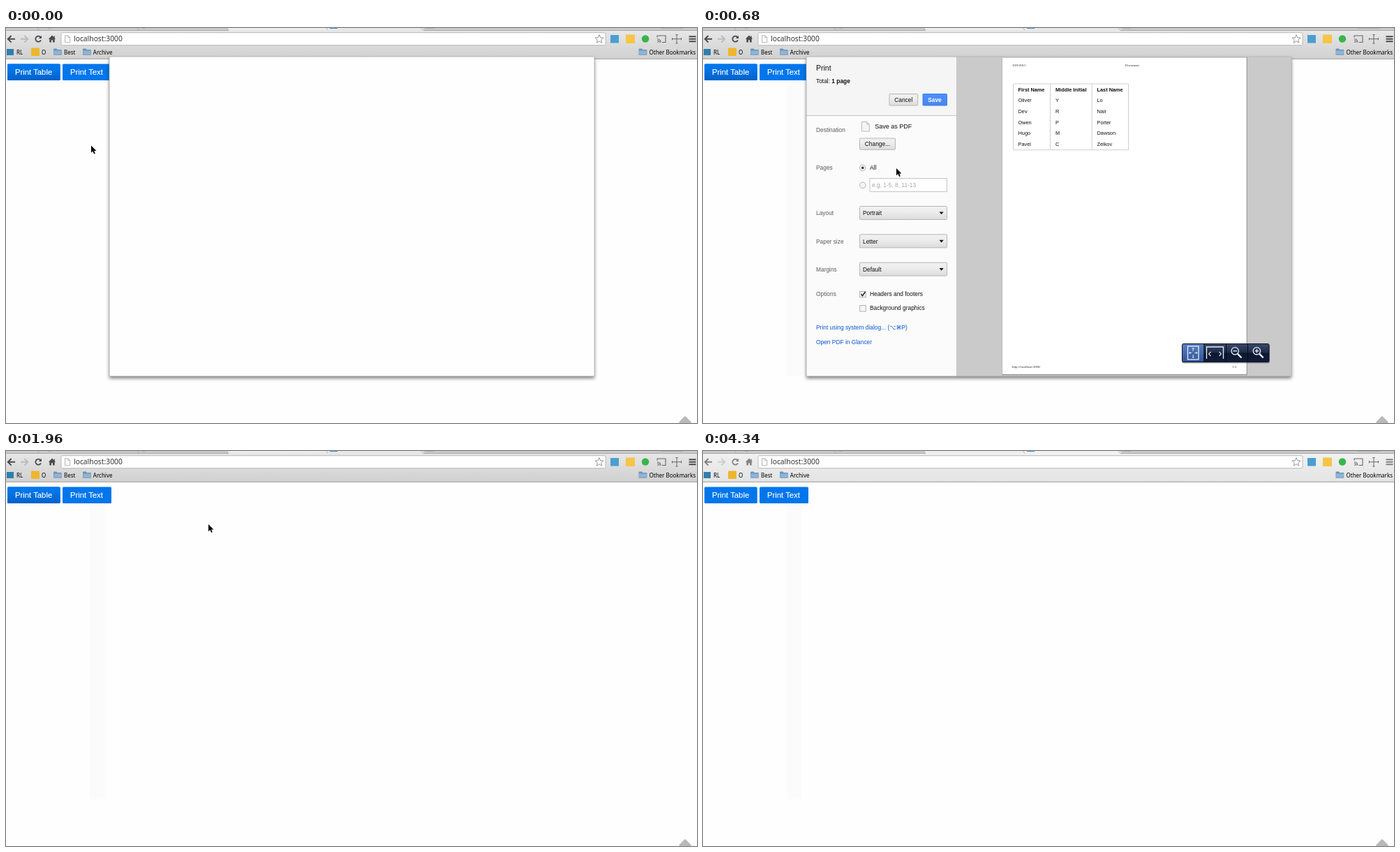
Animation, 990 px wide and 566 px high, one loop 4.44 s. Source, as an HTML page:

```html
<!DOCTYPE html>
<html lang="en">
<head>
<meta charset="utf-8">
<title>Print dialog</title>
<style>
  html, body { margin: 0; width: 100%; height: 100%; overflow: hidden; background: #fefefe; }
  svg { display: block; }
  text { font: 8.4px "Liberation Sans", Arial, sans-serif; fill: #111; white-space: pre; }
  .ui text { font: 8px "Noto Sans", sans-serif; fill: #000; }
  .ui .url { font-size: 10.3px; fill: #333; }
  .btn text { font-size: 11.3px; fill: #fff; stroke: #fff; stroke-width: .15; }
  .label { fill: #5c5c5c; }
  .link { fill: #1155cc; fill: #0b57d6; }
  .bold { font-weight: bold; }
  .mid { text-anchor: middle; }
  .table text { font-size: 7.35px; }
  .small text { font: 4.75px "Liberation Serif", serif; fill: #222; }
  .keys { font-family: "DejaVu Sans", sans-serif; font-size: 8px; }
</style>
</head>
<body>
<svg id="stage" width="990" height="566" viewBox="0 0 990 566">
  <defs>
    <linearGradient id="bar" x2="0" y2="1"><stop stop-color="#e9e9e9"/><stop offset=".5" stop-color="#dcdcdc"/><stop offset="1" stop-color="#d0d0d0"/></linearGradient>
    <linearGradient id="barIdle" x2="0" y2="1"><stop stop-color="#f2f2f2"/><stop offset="1" stop-color="#e3e3e3"/></linearGradient>
    <linearGradient id="pressed" x2="0" y2="1"><stop stop-color="#0078ee"/><stop offset=".35" stop-color="#0075e8"/><stop offset="1" stop-color="#0061c8"/></linearGradient>
    <linearGradient id="grey" x2="0" y2="1"><stop stop-color="#f1f1f1"/><stop offset=".4" stop-color="#ededed"/><stop offset="1" stop-color="#dcdcdc"/></linearGradient>
    <linearGradient id="greyDown" x2="0" y2="1"><stop stop-color="#dedede"/><stop offset="1" stop-color="#cfcfcf"/></linearGradient>
    <linearGradient id="blue" x2="0" y2="1"><stop stop-color="#4d90fe"/><stop offset="1" stop-color="#4787ed"/></linearGradient>
    <linearGradient id="navy" x2="0" y2="1"><stop stop-color="#3b4a69"/><stop offset=".48" stop-color="#1c2a48"/><stop offset=".52" stop-color="#0c1730"/><stop offset="1" stop-color="#101d3b"/></linearGradient>
    <linearGradient id="navyOn" x2="0" y2="1"><stop stop-color="#5a7fbe"/><stop offset="1" stop-color="#2f559c"/></linearGradient>
    <filter id="drop" x="-5%" y="-5%" width="110%" height="112%"><feDropShadow dx="0" dy="3" stdDeviation="2.4" flood-opacity=".5"/></filter>
    <clipPath id="below"><path d="M0 45H148V30H843V45H990V566H0z"/></clipPath>
    <g id="folder">
      <path d="M0 2a1 1 0 0 1 1-1h3.5l1.2 1.4H11a.8.8 0 0 1 .8.8V9.400a.8.8 0 0 1-.8.8H.8A.8.8 0 0 1 0 9.400z" fill="#6d95ba"/>
      <path d="M.5 4H11.300V9.300H.5z" fill="#8fb4d6"/>
    </g>
    <g id="caret"><path d="M0 0h6.200L3.100 3.600z" fill="#111"/></g>
  </defs>

  <rect width="990" height="566" fill="#fefefe"/>
  <rect data-on="230-4440" x="120" y="76" width="21.500" height="423" fill="#fbfbfb"/>

  <g class="ui">
    <rect width="990" height="44.500" fill="url(#bar)"/>
    <rect data-on="4340-4440" width="990" height="44.500" fill="url(#barIdle)"/>
    <path d="M0 0H316L319 3.500H0zM597 0H990V3.500H600z" fill="#c9c9c9"/>
    <path d="M319 0H459L462 3H321z" fill="#ededed"/>
    <path d="M0 3.500H318.500L316.500 0M45 0L48 3.500M188 0L191 3.500M458.500 0L461 3M594.500 0L598 3.500H990" fill="none" stroke="#a6a6a6" stroke-width=".9"/>
    <path d="M464 0h11v1h-11z" fill="#3d8fd8"/>
    <path d="M60 0h5M195 0h5M602 0h11M938 0h32" stroke="#999" stroke-width="1"/>
    <path d="M0 44.300H990" stroke="#a2a2a2"/>

    <g id="nav" fill="none" stroke="#4c4c4c" stroke-width="2">
      <path d="M13 15.800H3M7.600 11L2.800 15.800L7.600 20.600"/>
      <path d="M21 15.800H31M26.400 11L31.200 15.800L26.400 20.600" stroke="#bcbcbc"/>
      <path d="M49.600 13.400A4 4 0 1 0 50 17.300" stroke-width="1.800"/>
      <path d="M51 10.800V15H46.800z" fill="#4c4c4c" stroke="none"/>
      <path d="M66 10.600L60.800 15.800H62.300V20.600H65V17.300H67V20.600H69.700V15.800H71.200L69.800 14.300V11.600H68.500V13z" fill="#4c4c4c" stroke="none"/>
      <path d="M978.500 12.200H988.500M978.500 15.700H988.500M978.500 19.200H988.500"/>
    </g>

    <rect x="79" y="6.700" width="780" height="18" rx="1.500" fill="#fff" stroke="#b4b4b4" stroke-width=".9"/>
    <path d="M84.500 10.800H89L91.800 13.600V20.800H84.500zM89 10.800V13.600H91.800" fill="#fcfcfc" stroke="#a4a4a4" stroke-width=".8"/>
    <text class="url" x="97" y="19.400">localhost:3000</text>
    <path id="star" fill="#fff" stroke="#8c8c8c" stroke-width=".9"/>

    <rect x="866" y="10" width="12" height="11.500" fill="#4a9fd0"/>
    <rect x="888" y="9.500" width="13" height="12.500" fill="#f6c548"/>
    <circle cx="916" cy="15.500" r="5.200" fill="#38b54a"/>
    <path d="M933 13.500V11H945V20.500H940M933 20.500H934.200M933 18A2.500 2.500 0 0 1 935.800 20.700M933 15.800A4.800 4.800 0 0 1 938 20.700" fill="none" stroke="#666" stroke-width="1.100"/>
    <path d="M954.500 15.700H967.500M961 9.500V22M954.500 14V17.400M967.500 14V17.400M959.400 9.500H962.600M959.400 22H962.600" fill="none" stroke="#686868"/>

    <rect x="1" y="30" width="10" height="9" fill="#2f7fae"/>
    <text x="15" y="37.500">RL</text>
    <rect x="36" y="28.500" width="12" height="11.500" rx="1" fill="#eeb62f"/>
    <text x="51" y="37.500">O</text>
    <use href="#folder" x="68" y="28.500"/><text x="83" y="37.500">Best</text>
    <use href="#folder" x="110" y="28.500"/><text x="124.800" y="37.500">Archive</text>
    <use href="#folder" x="906.500" y="28.500"/><text x="921.500" y="37.500">Other Bookmarks</text>
  </g>

  <g class="btn">
    <rect x="2" y="51.500" width="75.700" height="23.500" rx="1.500" fill="#0076ec"/>
    <rect data-on="0-2690" x="2" y="51.500" width="75.700" height="23.500" rx="1.500" fill="url(#pressed)"/>
    <rect x="81" y="51.500" width="70" height="23.500" rx="1.500" fill="#0076ec"/>
    <text x="13" y="66.700">Print Table</text>
    <text x="92" y="66.700">Print Text</text>
  </g>
  <rect x="966.500" y="558.500" width="13" height="13" rx="1.500" fill="#b9b9b9" transform="rotate(45 973 565)"/>

  <g id="dialog" data-on="0-1960">
    <rect x="148" y="41" width="695" height="458" fill="#fff" filter="url(#drop)"/>
    <rect x="148" y="41" width="695" height="458" fill="#fefefe"/>
    <g data-on="230-1960">
      <rect x="148" y="41" width="215.500" height="84.500" fill="#f5f5f5"/>
      <rect x="148" y="125.500" width="215.500" height="373.500" fill="#fbfbfb"/>
      <path d="M148 125.500H363.500M363.500 41V499" stroke="#c6c6c6" fill="none"/>
      <rect x="364" y="41" width="479" height="458" fill="#e4e4e4"/>
      <text x="162" y="61.200" style="font-size:10.500px">Print</text>
      <text x="162" y="79.200">Total: <tspan class="bold" data-on="230-470">0 sheet of paper</tspan><tspan class="bold" data-on="470-1960">1 page</tspan></text>

      <rect x="267" y="94.500" width="40.700" height="16.500" rx="1" fill="url(#grey)" stroke="#b0b0b0" stroke-width=".9"/>
      <rect data-on="1690-1960" x="267" y="94.500" width="40.700" height="16.500" rx="1" fill="url(#greyDown)" stroke="#8e8e8e" stroke-width=".9"/>
      <text class="mid" x="287.300" y="105.600">Cancel</text>
      <g data-on="230-470">
        <rect x="315" y="94.500" width="34.500" height="16.500" rx="1" fill="#f0f0f0" stroke="#cfcfcf" stroke-width=".9"/>
        <text class="mid bold" x="332" y="105.600" style="fill:#aaa">Save</text>
      </g>
      <g data-on="470-1960">
        <rect x="315" y="94.500" width="34.500" height="16.500" rx="1" fill="url(#blue)" stroke="#3079ed" stroke-width=".9"/>
        <rect data-on="1690-1960" x="315" y="94.500" width="34.500" height="16.500" rx="1" fill="none" stroke="#a3adbd" stroke-width="1.100"/>
        <text class="mid bold" x="332" y="105.600" style="fill:#fff">Save</text>
      </g>

      <text class="label" x="162" y="148.500">Destination</text>
      <path d="M227.500 134.500H234.800L238.300 138V148H227.500zM234.800 134.500V138H238.300" fill="#f5f5f5" stroke="#aaa" stroke-width=".8"/>
      <text x="246.300" y="144.300" style="font-size:9px">Save as PDF</text>
      <rect x="224.500" y="158" width="51" height="16.300" rx="1" fill="url(#grey)" stroke="#b0b0b0" stroke-width=".9"/>
      <text x="231.800" y="169">Change...</text>

      <g id="links">
        <text class="link" x="162" y="203.500">Print using system dialog... (<tspan class="keys">⌥⌘</tspan>P)</text>
        <text class="link" x="162" y="224.300">Open PDF in Glancer</text>
      </g>

      <g data-on="470-1960">
        <text class="label" x="162" y="203">Pages</text>
        <g fill="#f6f6f6" stroke="#a8a8a8" stroke-width=".9"><circle cx="228.800" cy="200.300" r="4.300"/><circle cx="228.800" cy="225.300" r="4.300"/></g>
        <circle cx="228.800" cy="200.300" r="1.900" fill="#444"/>
        <text x="239" y="203">All</text>
        <rect x="239" y="215.500" width="110.500" height="19" fill="#fff" stroke="#bfbfbf" stroke-width=".9"/>
        <text x="242" y="228.200" style="fill:#a5a5a5">e.g. 1-5, 8, 11-13</text>
        <g id="selects"></g>
        <text class="label" x="162" y="384">Options</text>
        <g fill="#f6f6f6" stroke="#a8a8a8" stroke-width=".9"><rect x="224.700" y="377.400" width="8.500" height="8.500"/><rect x="224.700" y="397.600" width="8.500" height="8.500"/></g>
        <path d="M226.500 381.300L228.500 383.800L232.500 378" fill="none" stroke="#222" stroke-width="1.500"/>
        <text x="239" y="384">Headers and footers</text>
        <text x="239" y="404.300">Background graphics</text>
      </g>

      <text data-on="230-680" x="562.500" y="279" style="font-size:9.200px;fill:#333">Loading content <tspan letter-spacing="1.200">...</tspan></text>

      <g data-on="680-1960">
        <rect x="364" y="41" width="479" height="458" fill="#cacaca"/>
        <rect x="428" y="42" width="352" height="455.500" fill="#9d9d9d"/>
        <rect x="428.700" y="42.500" width="350" height="453.500" fill="#fff"/>
        <g class="small">
          <text x="443" y="54.500">10/9/2015</text>
          <text x="605" y="54.500">Document</text>
          <text x="443" y="487">http://localhost:3000/</text>
          <text x="758.500" y="487">1/1</text>
        </g>
        <path d="M444.500 80H609.500V174.700H444.500zM497.500 80V174.700M557.200 80V174.700" fill="none" stroke="#c9c9c9" stroke-width=".9"/>
        <g class="table" id="table"></g>
        <rect x="686" y="453" width="126" height="27.500" rx="2.500" fill="#000" opacity=".35"/>
        <rect x="686.500" y="452.500" width="124.500" height="26" rx="2" fill="url(#navy)" stroke="#0c1428"/>
        <rect x="687" y="453" width="30.500" height="25" rx="1.500" fill="url(#navyOn)"/>
        <path d="M718 453V478M749.500 453V478M780.500 453V478" stroke="#050b1a"/>
        <g fill="none" stroke="#e9eef8" stroke-width="1.300">
          <rect x="694.500" y="456" width="15.500" height="19"/>
          <path d="M702.200 458.500V463M702.200 468V472.500M696.500 465.500H700M704.500 465.500H708M700.800 460L702.200 458.500L703.600 460M700.800 471L702.200 472.500L703.600 471M698 464L696.500 465.500L698 467M706.500 464L708 465.500L706.500 467" stroke-width=".9"/>
          <path d="M721.500 474V457H745.500V474"/>
          <path d="M727.500 464L724.500 467L727.500 470M739.500 464L742.500 467L739.500 470" stroke-width="1.100"/>
          <g id="lens"><circle cx="762.200" cy="462.800" r="5.200"/><path d="M766 466.800L771.500 472.500" stroke-width="2.400"/><path d="M759.500 462.800H765"/></g>
          <use href="#lens" x="31.200"/><path d="M793.400 460V465.600"/>
        </g>
      </g>
    </g>
    <path d="M148 41.200H843V499" fill="none" stroke="#b5b5b5" stroke-width=".8"/>
    <path d="M148 41V499H843" fill="none" stroke="#a8a8a8" stroke-width=".8"/>
  </g>

  <path id="cursor" data-on="0-3620" d="M0 0V10.300L2.400 8.100L4.100 12L5.800 11.200L4.200 7.500H7.400z" fill="#000" stroke="#fff" stroke-width=".8" paint-order="stroke"/>
</svg>
<script>
const $ = id => document.getElementById(id);
const LOOP = 4440, FADE = 1840, IDLE = 4340;

// time, x, y of the pointer tip
const path = [
  [0, 122, 168.5], [230, 167, 173.5], [470, 277, 201], [830, 327.500, 152],
  [980, 347, 136], [1100, 338, 114], [1215, 305, 98], [1330, 275, 97],
  [1450, 290, 105], [2160, 270, 109], [2340, 247, 127], [2450, 225, 137],
  [2690, 310, 186], [2800, 482, 276], [2920, 598, 329.5],
  [3160, 772, 432], [3270, 912, 523], [3510, 918, 525]
];

const rows = [
  ["First Name", "Middle Initial", "Last Name"],
  ["Oliver", "Y", "Lo"], ["Dev", "R", "Nair"], ["Owen", "P", "Porter"],
  ["Hugo", "M", "Dawson"], ["Pavel", "C", "Zelkov"]
];
$("table").innerHTML = rows.map((row, r) => row.map((cell, c) =>
  `<text x="${[451.5, 505, 564.5][c]}" y="${90.7 + r * 15.6}"${r ? "" : ' class="bold"'}>${cell}</text>`
).join("")).join("");

const selects = [["Layout", "Portrait"], ["Paper size", "Letter"], ["Margins", "Default"]];
$("selects").innerHTML = selects.map(([name, value], i) => {
  const y = 255.5 + i * 40.3;
  return `<text class="label" x="162" y="${y + 12.7}">${name}</text>
    <rect x="224.5" y="${y}" width="125" height="19" rx="1" fill="url(#grey)" stroke="#b0b0b0" stroke-width=".9"/>
    <text x="229" y="${y + 12.7}">${value}</text><use href="#caret" x="338.500" y="${y + 8}"/>`;
}).join("");

const starPoints = Array.from({ length: 10 }, (_, i) => {
  const a = i * Math.PI / 5, r = i % 2 ? 2.8 : 6.4;
  return (850 + r * Math.sin(a)).toFixed(2) + " " + (16 - r * Math.cos(a)).toFixed(2);
});
$("star").setAttribute("d", "M" + starPoints.join("L") + "z");

const timed = [...document.querySelectorAll("[data-on]")].map(el => {
  const [from, to] = el.dataset.on.split("-").map(Number);
  return { el, from, to };
});

function draw(t) {
  for (const { el, from, to } of timed) el.style.display = t >= from && t < to ? "" : "none";
  const [, x, y] = path.findLast(p => p[0] <= t);
  $("cursor").setAttribute("transform", `translate(${x} ${y})`);
  $("links").setAttribute("transform", `translate(0 ${t < 470 ? 0 : 228.5})`);
  $("dialog").style.opacity = t < FADE ? 1 : 0.5;
  $("nav").style.opacity = t < IDLE ? 1 : 0.65;
}

const start = performance.now();
function tick() {
  draw((performance.now() - start) % LOOP);
  requestAnimationFrame(tick);
}
tick();
</script>
</body>
</html>
```
